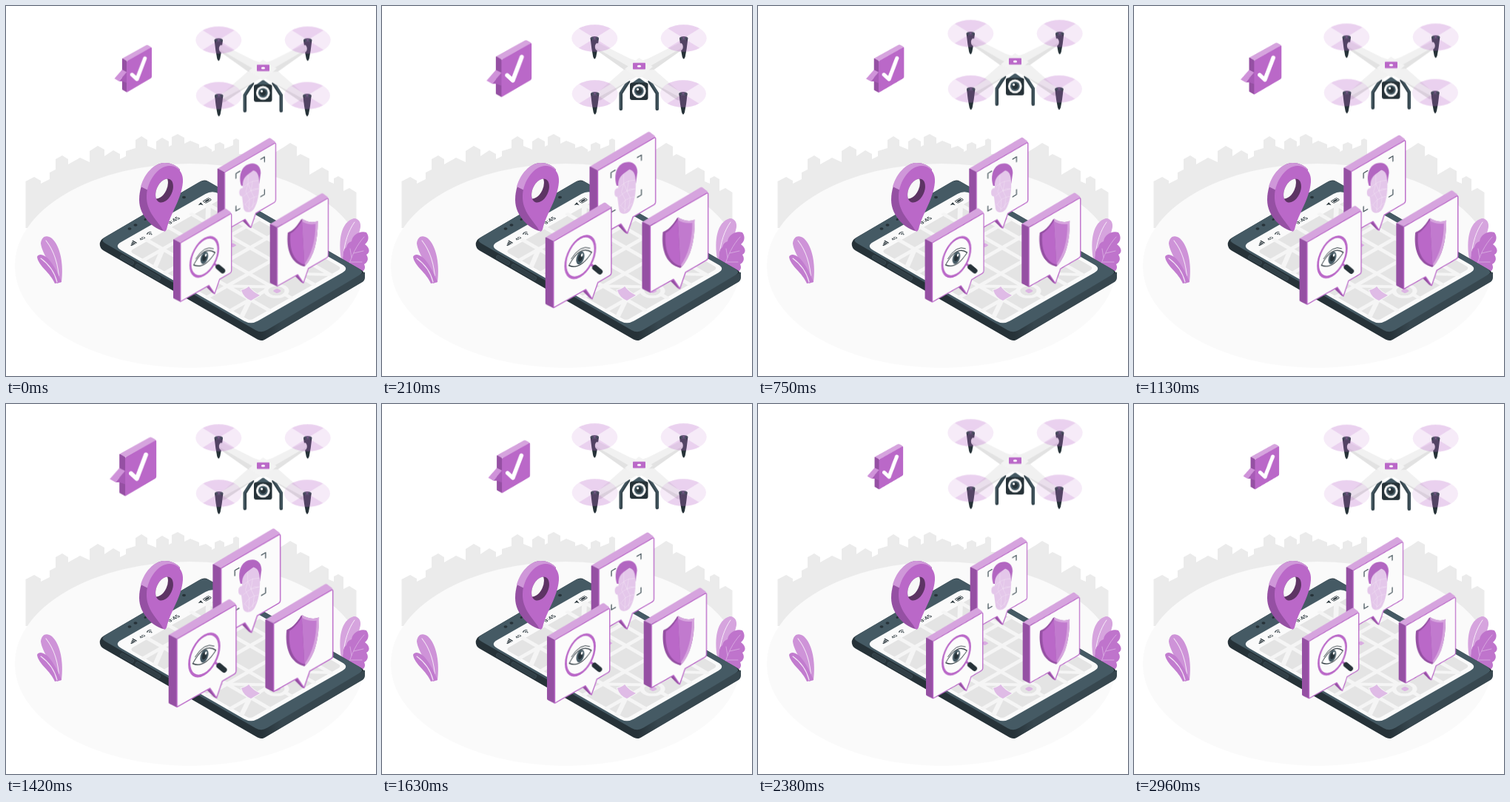
Write an HTML page that moves like this. It is 500 px wide and 500 px high and loops after 3000 ms.

```html
<!DOCTYPE html>
<html lang="en">
<head>
<meta charset="utf-8">
<title>Drone and phone</title>
<style>
  html, body { margin: 0; width: 100%; height: 100%; overflow: hidden; background: #fff; }
  svg { display: block; width: 100vw; height: 100vh; }
  text { font-family: Inter, Arial, sans-serif; font-weight: 600; fill: #263238; }
</style>
</head>
<body>
<svg id="stage" viewBox="0 0 500 500"></svg>
<script>
const MAIN = '#ba68c8', LIGHT = '#d6a4de', DEEP = '#9550a3', INK = '#263238', SLATE = '#37474f', STEEL = '#455a64';

const path = (d, fill, extra = '') => `<path d="${d}" fill="${fill}" ${extra}/>`;
const line = (d, color, width, extra = '') =>
  path(d, 'none', `stroke="${color}" stroke-width="${width}" stroke-linecap="round" stroke-linejoin="round" ${extra}`);
const oval = (x, y, rx, ry, fill, extra = '') =>
  `<ellipse cx="${x}" cy="${y}" rx="${rx}" ry="${ry}" fill="${fill}" ${extra}/>`;
const group = (attrs, ...parts) => `<g ${attrs}>${parts.join('')}</g>`;

// Closed polygon with softened corners
function rounded(points, size) {
  const toward = (p, q) => {
    const k = size / Math.hypot(q[0] - p[0], q[1] - p[1]);
    return [p[0] + (q[0] - p[0]) * k, p[1] + (q[1] - p[1]) * k];
  };
  const n = points.length;
  return points.map((p, i) =>
    `${i ? 'L' : 'M'}${toward(p, points[(i + n - 1) % n])}Q${p} ${toward(p, points[(i + 1) % n])}`).join('') + 'Z';
}

function backdrop() {
  const skyline = 'M26.500 300V237L38 231 47 236V240L59 234V225L67 221V207L76 202 84 207V214L100 205 113 211V196' +
    'L124 189 133 194V203L145 195 154 200V207L162 203V196L175 192V181L183 176 191 181V189L203 194V183L211 178' +
    ' 220 183V190L224 188V177L232 173 241 178V186L249 182 261 187V192L270 189 278 194V197L282 195V187L289 184' +
    ' 295 187V193L307 188V181L311 179 315 181V200H360L375 191 384 185 393 190V203L398 200 410 206V228L427 218' +
    ' 436 223V237L443 240V233L449 230 456 234V250L464 246 473.500 252V300Z';
  return path(skyline, '#ebebeb') + oval(248, 351, 236, 138, '#fafafa');
}

function plants() {
  return path('M69 375C64 352 49 336 47 321C48 311 55 309 62 314C74 325 78 350 75 373Z', '#ce93d8') +
    line('M72 373C71 350 66 332 54 317', '#f3e5f5', 1.1) +
    path('M66 375C60 360 44 352 42 339C45 333 54 337 60 345C68 356 72 365 75 373Z', '#c27ccf') +
    line('M69 373C66 361 58 349 47 341', '#f3e5f5', 1.1) +
    path('M453 342C449 318 452 292 470 287C478 287 481 295 478 303C476 318 462 330 458 346Z', LIGHT) +
    line('M456 338C457 320 463 303 471 292', '#f7ecf9', 1) +
    path('M456 360C456 345 453 330 460 326Q461 320 467 318C468 308 480 303 487 306C492 313 489 319 485 322' +
      'C491 326 493 333 487 336C491 342 488 347 484 349C487 355 483 360 478 359L470 364Z', '#bf74cc') +
    line('M463 352C467 337 474 323 484 312M467 340L465 328M470 334L483 331M466 346L481 346', '#d9ace1', .9);
}

function screenMap() {
  const roads = 'M4 42H149M4 76H149M4 108H149M4 142H149M4 178H149M34 17V207M68 17V207M104 17V207M130 17V207' +
    'M4 60L34 42M68 108L104 76M104 142L149 120M34 142L68 178M4 195L34 178M104 178L130 207M104 42L130 17';
  const wifi = 'M42 9.500Q45 7 48 9.500M43.500 11.500Q45 10 46.500 11.500';
  const bars = [0, 1, 2, 3].map(i =>
    `<rect x="${14 + i * 2.3}" y="${11.5 - i * 1.5}" width="1.6" height="${2 + i * 1.5}" fill="${INK}"/>`).join('');
  return group('transform="matrix(.868 -.497 .867 .499 146 324.5)"',
    `<rect x="5" y="19" width="143" height="188" rx="5" fill="#e4e4e4"/>`,
    line(roads, '#f5f5f5', 5.5),
    oval(66, 187, 14, 14, '#f5f5f5'), oval(66, 187, 9, 9, '#e4e4e4'),
    `<rect x="63" y="184" width="7" height="7" rx="2" fill="#dcb5e3"/>`,
    `<rect x="91" y="88" width="6" height="6" rx="1" fill="#d9ace1"/>`,
    bars, line(wifi, INK, 1.1), oval(45, 13.3, .8, .8, INK),
    '<text x="28.500" y="13.500" font-size="5.500">4G</text>',
    '<text x="73" y="14" font-size="7.500">9:45</text>',
    path('M121 10L127 8 125 14 124 11Z', INK),
    `<rect x="130" y="8" width="9" height="5" rx="1" fill="none" stroke="${INK}" stroke-width=".8"/>`,
    `<rect x="131.500" y="9.300" width="6" height="2.400" fill="${INK}"/>`) +
    path('M318 384Q325 382 328 379Q333 386 343 391L331 398Q321 394 318 384Z', '#dfbbe6',
      'stroke="#f5f5f5" stroke-width="2" paint-order="stroke"');
}

function phone() {
  const top = [268, 234], right = [485, 359.5], bottom = [345, 442.4], left = [126.7, 316.5];
  const down = ([x, y]) => [x, y + 11];
  const button = d => line(d, SLATE, 6) + line(d, '#303e45', 4);
  return '<linearGradient id="edge"><stop offset="0" stop-color="#263238"/><stop offset=".2" stop-color="#37474f"/></linearGradient>' +
    path(rounded([top, right, down(right), down(bottom), down(left), left], 6), INK) +
    path(`M345 440L${right}V${right[1] + 7}Q485 372 480 374L350 450.500Q347 452 345 452Z`, 'url(#edge)') +
    path(rounded([top, right, bottom, left], 9), STEEL) +
    button('M157 339.500L170 347') + button('M177.500 351.500L206 368') +
    oval(167, 301, 2.5, 1.7, INK) + oval(175, 296, 2.5, 1.7, INK) + oval(240.5, 258.5, 2.5, 1.7, INK) +
    line('M188 288.500L222 269', INK, 3) +
    path(rounded([[279, 248.5], [464, 355], [331, 431], [146, 324.5]], 11), '#fafafa') + screenMap();
}

function pin() {
  const hole = (dx, dy, fill, extra = '') => oval(214 + dx, 249.5 + dy, 10.5, 17, fill,
    `transform="rotate(25 ${214 + dx} ${249.5 + dy})" ${extra}`);
  return `<clipPath id="hole">${hole(0, 0, '#000')}</clipPath>` +
    path('M213 304C201 302 180 285 180 262C180 236 197 213 213 212C222 211.500 230 215 235 221Z', DEEP) +
    path('M182 244C187 226 200 213 213 212C222 211.500 230 215 235 221L215 240 192 249Z', '#cf97d9') +
    path('M213 304C205 290 189 278 190 256C191 236 206 215 222 216C235 217 240 228 239 238C237 262 222 280 217 302Q215 306 213 304Z', MAIN) +
    hole(0, 0, '#5d3464') + group('clip-path="url(#hole)"', hole(-7, -5, '#f8f8f8'));
}

// tail: how far the pointer sits along the lower edge
function panel(dx, dy, tail, cx, cy, art) {
  const at = (x, y) => `${x + tail} ${y - tail * .577}`;
  const box = group('class="pulse" data-c="265.500,336.500" data-k="1.210"',
    path(rounded([[227, 316], [296, 275], [304, 281], [236.5, 320]], 1.5), LIGHT),
    path(rounded([[227, 315.5], [237, 320.5], [237, 398.5], [227, 393.5]], 1), DEEP),
    path(`M${at(270, 378)}L${at(275, 375)}L${at(282, 388)}Q${at(280, 388)} ${at(278, 386)}Z`, DEEP),
    path(`M236.500 320.500L302 282.500Q303.700 281.700 303.700 283.500V357Q303.700 359.300 302 360.300L${at(288, 368.5)}L${at(281.5, 387.5)}L${at(274, 376.5)}L236.500 397.800Z`,
      '#fbfbfb', `stroke="${MAIN}" stroke-width="1.200" stroke-linejoin="round"`));
  return group(`transform="translate(${dx} ${dy})"`, box) +
    group(`class="pulse" data-c="${cx},${cy}" data-k="1.100"`, art);
}

function faceArt() {
  const frame = 'M-22 -18.500V-25H-16M16 -25H22V-18.500M22 18.500V25H16M-16 25H-22V18.500';
  const mesh = 'M321 245L327 240 333 237 341 236M321 257L327 252 335 247 341 247M323 268L329 261 335 258 340 257' +
    'M327 240L324 251 329 261 328 276M333 237L331 250 335 258 333 272M327 229L327 240 331 250 341 247M323 268L329 274 337 265';
  return group('transform="matrix(.866 -.5 0 1 330 240.5)"', line(frame, SLATE, 1.3)) +
    path('M318 243C314 230 318 217 328 214C337 211 344 216 344 226L342 240 321 243Z', '#b266c1') +
    path('M320 240C321 230 327 228 334 222.500C341 224 342 232 342 242C342 258 338 270 334 275C329 280 322 279 321 273L319 257C314 258 314 245 320 246Z', '#e4c7ea') +
    line(mesh, '#f3e5f5', .6, 'opacity=".8"');
}

function eyeArt() {
  return line('M281 348L286 352', MAIN, 3) +
    line('M286.500 352.500L292.500 357.500', INK, 7) +
    group('transform="matrix(.866 -.5 0 1 268 339)"',
      oval(0, 0, 21.5, 23.8, '#fbfbfb', `stroke="${MAIN}" stroke-width="3"`),
      path('M-16.500 2.500Q0 -16 16.500 2.500Q0 17 -16.500 2.500Z', '#fff', `stroke="${INK}" stroke-width="1.100" stroke-linejoin="round"`),
      line('M-13 -4Q0 -16 14 -4', INK, .8),
      oval(0, 1.3, 6, 7.5, STEEL), oval(0, 1.3, 3.3, 4.2, INK), oval(2.3, -1.2, 1.5, 1.8, '#fff'));
}

function shieldArt() {
  const rim = 'M400 288C394 298 388 304 382 306C380 325 384 346 404 351C416 338 421 318 421 291C414 294 406 292 400 288Z';
  return path(rim, DEEP, 'transform="translate(-1 .6)"') + path(rim, DEEP) +
    path('M400 288C406 292 414 294 421 291C421 318 416 338 404 351Z', LIGHT) +
    path('M400 290.500C395 299 389 305.500 384.500 307.500C383 326 387 344 403 349Z', MAIN) +
    path('M400 291.500C406 295 412 296 418 295C418 316 413 335 403 349Z', '#c17ace');
}

function checkBubble() {
  return group('class="pulse" data-c="172,84.700" data-k="1.330"',
    path(rounded([[157.5, 71.5], [190, 53.5], [196, 57], [163.5, 75]], 1.5), LIGHT),
    path(rounded([[157.5, 71], [164, 75], [164, 115.5], [157.5, 112]], 1), DEEP),
    path('M153.500 101L163.500 89V103L157.500 101Z', '#a85bb7'),
    path('M147.500 97.500L157.500 86 163.500 89 153.500 101Z', '#cf92d9'),
    path(rounded([[163.5, 75], [196, 56.7], [196, 96.5], [163.5, 115.5]], 1.5), MAIN)) +
    group('class="pulse" data-c="179,85" data-k="1.200"',
      line('M170.500 92.500L177 98.500 187.500 71', '#fff', 5));
}

function motor(x, y) {
  return path(`M${x - 5.7} ${y}L${x - 4} ${y + 14}L${x - 2} ${y + 25}Q${x} ${y + 31} ${x + 2} ${y + 25}L${x + 4} ${y + 14}L${x + 5.7} ${y}Z`, INK) +
    oval(x, y, 5.7, 2.4, SLATE) + oval(x, y - .4, 2, .8, '#6b5378');
}

function blur(x, y) {
  const wedge = s => path(`M${x} ${y}L${x - 21.5} ${y - 13.2 * s}A31 18.500 0 0 ${s > 0 ? 1 : 0} ${x + 21.5} ${y - 13.2 * s}Z`, MAIN, 'opacity=".2"');
  return oval(x, y, 31, 18.5, MAIN, 'opacity=".13"') + wedge(1) + wedge(-1);
}

function drone() {
  const mirror = part => part + group('transform="matrix(-1 0 0 1 694.6 0)"', part);
  const leg = line('M333 105L322.800 121V142', SLATE, 4.6) + line('M331.500 105L321.800 121V141', STEEL, 1.5);
  const arms = path('M346 96L329 91 289 123 291 131 296 130Z', '#dfdfdf') +
    path('M347 84L330 86 289 122 293 126 347 97Z', '#f1f1f1') +
    path('M347 90L327 89 289 62Q286 57 290 53Z', '#e2e2e2') +
    path('M347 78L335 74 293 53Q288 53 288.500 59L330 83 347 92Z', '#f1f1f1');
  const high = [[287.3, 46.5], [407.7, 46.5]], low = [[287.7, 121.5], [407, 121.5]];
  const each = (list, draw) => list.map(p => draw(...p)).join('');
  return group('id="drone"',
    mirror(leg), path('M335 109L347.500 100 360 109Z', STEEL), each(high, motor), mirror(arms),
    path('M347.300 73L366 85 347.300 101 328 88Z', '#f3f3f3'),
    `<rect x="335" y="106.500" width="24.500" height="23.500" rx="3" fill="${INK}"/>`,
    oval(347.3, 117.8, 9.4, 9.4, '#f2f2f2'), oval(347.3, 117.8, 6.4, 6.4, STEEL),
    oval(347.3, 117.8, 4.2, 4.2, INK), oval(345.6, 115.6, 1.6, 1.6, '#fff'),
    `<rect x="339" y="79.800" width="17" height="8.800" rx=".8" fill="${MAIN}"/>`,
    oval(347.5, 84.2, 2.7, 1.5, '#fff'),
    each(low, motor), each([...high, ...low], blur));
}

const stage = document.getElementById('stage');
stage.innerHTML = backdrop() + plants() + phone() +
  panel(59.7, -95.6, -10.5, 330, 245, faceArt()) + pin() +
  panel(0, 0, 0, 269, 338, eyeArt()) + panel(130.7, -20.8, -10.5, 401, 320, shieldArt()) +
  checkBubble() + drone();

// Pulse strength over one loop: [ms, amount]
const LOOP = 3000;
const beats = [[0, 0], [300, 1], [870, 0], [900, 0], [1500, 1], [1800, 0], [LOOP, 0]];
const timing = duration => ({ duration, iterations: Infinity, delay: -20 });

for (const el of document.querySelectorAll('.pulse')) {
  const [x, y] = el.dataset.c.split(',');
  el.style.transformOrigin = `${x}px ${y}px`;
  el.animate(beats.map(([ms, p]) => ({
    offset: ms / LOOP,
    transform: `scale(${1 + (el.dataset.k - 1) * p})`
  })), timing(LOOP));
}
document.getElementById('drone').animate(
  [0, -9.6, 0].map(y => ({ transform: `translateY(${y}px)` })), timing(LOOP / 2));
</script>
</body>
</html>
```
